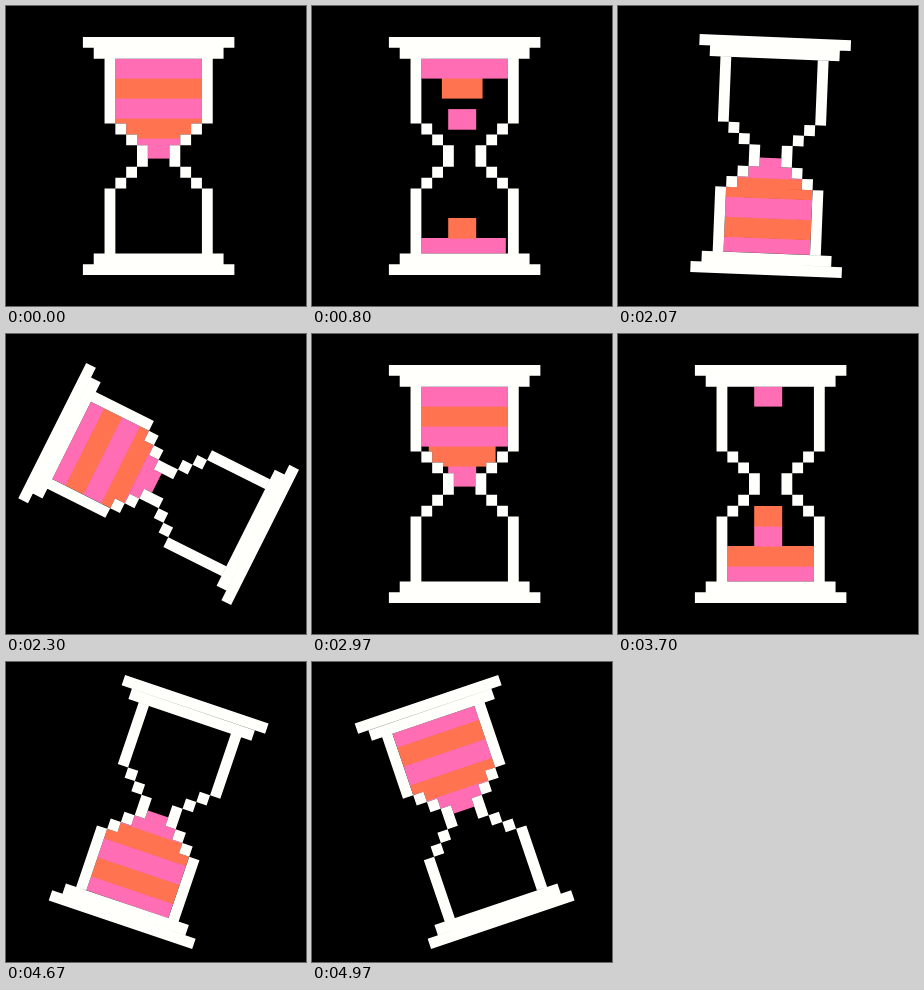
Write an HTML page that moves like this. It is 300 by 300 pixels and loops after 5.01 s.

```html
<!DOCTYPE html>
<html lang="en">
<head>
<meta charset="utf-8">
<title>Hourglass</title>
<style>
  html, body { margin: 0; width: 100%; height: 100%; overflow: hidden; background: #000; }
  svg { display: block; width: 100%; height: 100%; }
</style>
</head>
<body>
<svg viewBox="0 0 300 300">
  <defs><clipPath id="inside"><path id="cavity"/></clipPath></defs>
  <g id="hourglass">
    <g id="sand" clip-path="url(#inside)"></g>
    <path id="glass" fill="#fffffb"/>
  </g>
</svg>
<script>
const LOOP = 5010, TICK = 33.4, LAST_TICK = 149;
const CELL = 10.82, LEFT = 76.9, TOP = 31;
const CENTER_X = LEFT + 7 * CELL, CENTER_Y = TOP + 11 * CELL;
const PINK = '#ff6eb4', ORANGE = '#ff7350';
const LAYER = 20, NARROW = 28, WIDE = 92, SAND_X = 150.2, FALL = 6;

const byId = id => document.getElementById(id);
const clamp = v => Math.max(0, Math.min(1, v));
const smooth = v => { v = clamp(v); return v * v * (3 - 2 * v); };
const progress = (t, from, to) => (t - from) / (to - from);

// Rectangle in grid cells as a path piece.
const cells = (col, row, w, h) =>
  `M${LEFT + col * CELL} ${TOP + row * CELL}h${w * CELL}v${h * CELL}h${-w * CELL}z`;

// Wall sections of the upper half: inner column, first row, row count.
const walls = [[2, 2, 6], [3, 8, 1], [4, 9, 1], [5, 10, 1]];
let glassPath = cells(0, 0, 14, 1) + cells(1, 1, 12, 1)
  + cells(1, 20, 12, 1) + cells(0, 21, 14, 1);
let cavityPath = '';
for (const [col, row, h] of walls) {
  for (const y of [row, 22 - row - h]) {
    glassPath += cells(col, y, 1, h) + cells(13 - col, y, 1, h);
    cavityPath += cells(col + 1, y, 12 - 2 * col, h);
  }
}
byId('glass').setAttribute('d', glassPath);
byId('cavity').setAttribute('d', cavityPath);

// Lowest layer first; values are ticks within one run of the sand.
const layers = [
  { squeeze: 1, drop: 11, spread: 19 },
  { squeeze: 8, drop: 17, spread: 26 },
  { squeeze: 14, drop: 22, spread: 33 },
  { squeeze: 19, drop: 27, spread: 45 },
  { squeeze: 25, drop: 39, spread: 45 }
].map((layer, i) => {
  const rect = document.createElementNS('http://www.w3.org/2000/svg', 'rect');
  rect.setAttribute('height', LAYER + 0.6);
  rect.setAttribute('fill', i % 2 ? ORANGE : PINK);
  byId('sand').appendChild(rect);
  return { ...layer, rect, top: 132 - i * LAYER };
});

const runs = [
  { start: 0, end: 76, turn: [[61, 0], [64, 0.2], [69, 0.6], [72, 0.6], [76, 1]] },
  { start: 78, end: 150, turn: [[137, 0], [152, 1]] }
];

function keyed(keys, t) {
  if (t <= keys[0][0]) return keys[0][1];
  for (let i = 1; i < keys.length; i++) {
    const [t0, v0] = keys[i - 1], [t1, v1] = keys[i];
    if (t <= t1) return v0 + (v1 - v0) * progress(t, t0, t1);
  }
  return keys[keys.length - 1][1];
}

function drawSand(t) {
  for (const { squeeze, drop, spread, rect, top } of layers) {
    const narrowing = smooth(progress(t, squeeze, squeeze + 7));
    const widening = smooth(progress(t, spread, spread + 6));
    const width = WIDE + (NARROW - WIDE) * (narrowing - widening);
    const fall = clamp(progress(t, drop, drop + FALL));
    rect.setAttribute('x', SAND_X - width / 2);
    rect.setAttribute('width', width);
    rect.setAttribute('y', top + 100 * fall * fall);
  }
}

function render(ms) {
  const tick = Math.min(LAST_TICK, Math.floor((ms % LOOP) / TICK + 0.3));
  const run = tick < runs[0].end ? runs[0] : runs[1];
  const angle = 180 * smooth(keyed(run.turn, tick));
  drawSand(tick - run.start);
  byId('hourglass').setAttribute('transform', `rotate(${angle} ${CENTER_X} ${CENTER_Y})`);
}

const began = performance.now();
function loop() {
  render(performance.now() - began);
  requestAnimationFrame(loop);
}
loop();
</script>
</body>
</html>
```
